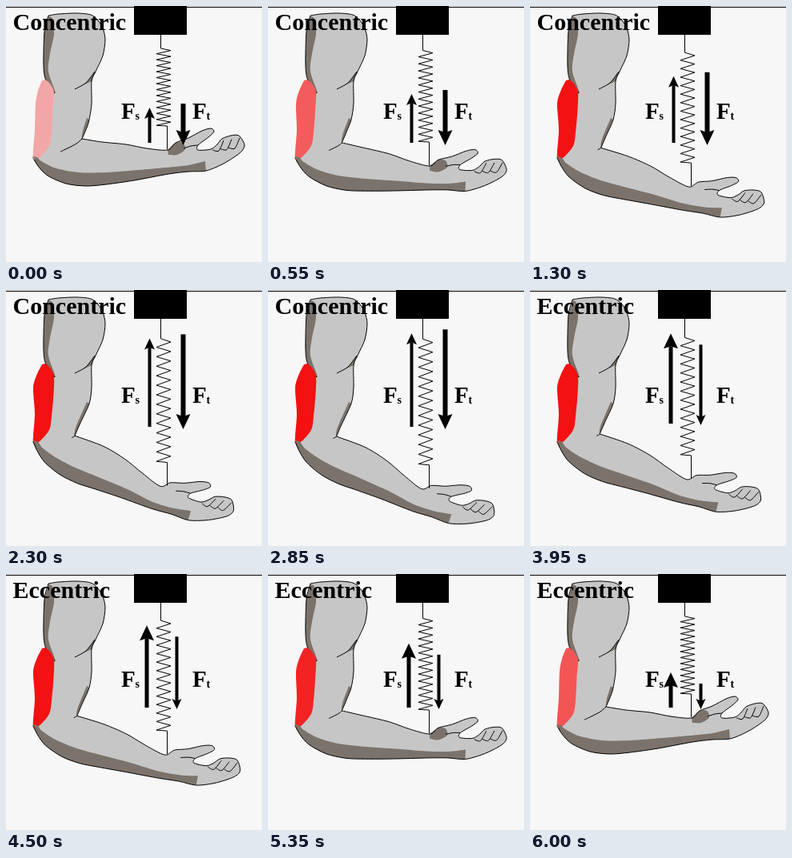
An HTML page with a canvas for the animation above (6100 ms loop, 320 by 320 pixels).

```html
<!DOCTYPE html>
<html lang="en">
<head>
<meta charset="utf-8">
<title>Muscle contraction</title>
<style>
html, body { margin: 0; width: 100%; height: 100%; overflow: hidden; background: #f7f7f7; }
canvas { display: block; width: 320px; height: 320px; }
</style>
</head>
<body>
<canvas id="stage" width="320" height="320"></canvas>
<script>
const ctx = document.getElementById('stage').getContext('2d');
const SKIN = '#c6c6c6', SHADE = '#7b736b', INK = '#000';
const LOOP = 6100;
const STEPS = [250, 550, 900, 1300, 1750, 2300, 2850, 3400, 3950, 4500, 4950, 5350, 5700, 6000];
const ELBOW = { x: 32, y: 190 };

// Key points of the fully bent arm; bend() gives every other pose.
const DELTOID = [53,12, 66,10, 88,9, 106,11, 115,18, 121,28, 124,42, 121,62, 112,82];
const UPPER_EDGE = [120,170, 150,173, 176,178, 202,180];
const THUMB = [212,171, 228,165, 245,156, 256,153, 260,157, 253,164, 240,174];
const FINGERS = [240,180, 256,179, 264,173, 270,166, 281,162, 291,162, 298,173, 295,181, 285,189, 270,198, 250,206];
const LOWER_EDGE = [250,206, 228,207, 203,210, 160,218, 125,223, 100,225, 75,222, 52,212, 40,200, 34,189];
const SHADE_EDGE = [60,202, 90,208, 125,208, 165,205, 200,202, 228,199, 249,194];
const THUMB_BASE = [202,180, 212,171, 221,171, 224,179, 214,186, 203,186];
const FINGER_GAP = [258,180, 266,181, 272,168];

// Turns points about the elbow, less so close to the joint.
function bend(list, angle) {
  const out = [];
  for (let i = 0; i < list.length; i += 2) {
    const dx = list[i] - ELBOW.x, dy = list[i + 1] - ELBOW.y;
    const r = Math.hypot(dx, dy);
    const a = Math.atan2(dy, dx) + angle * Math.min(1, Math.sqrt(r / 170));
    out.push(ELBOW.x + r * Math.cos(a), ELBOW.y + r * Math.sin(a));
  }
  return out;
}

const shift = (list, dx, dy) => list.map((v, i) => v + (i % 2 ? dy : dx));

// Smooth curve through a flat list of coordinates.
function trace(list) {
  const n = list.length / 2;
  const at = i => {
    const j = 2 * Math.max(0, Math.min(n - 1, i));
    return [list[j], list[j + 1]];
  };
  ctx.beginPath();
  ctx.moveTo(...at(0));
  for (let i = 0; i < n - 1; i++) {
    const [a, b, c, d] = [at(i - 1), at(i), at(i + 1), at(i + 2)];
    ctx.bezierCurveTo(b[0] + (c[0] - a[0]) / 7, b[1] + (c[1] - a[1]) / 7,
      c[0] - (d[0] - b[0]) / 7, c[1] - (d[1] - b[1]) / 7, c[0], c[1]);
  }
}

function fill(list, color) {
  trace(list);
  ctx.fillStyle = color;
  ctx.fill();
}

function line(list) {
  trace(list);
  ctx.strokeStyle = INK;
  ctx.lineWidth = 1;
  ctx.stroke();
}

function polyline(list) {
  ctx.beginPath();
  for (let i = 0; i < list.length; i += 2) ctx.lineTo(list[i], list[i + 1]);
  ctx.strokeStyle = INK;
  ctx.lineWidth = 1;
  ctx.stroke();
}

function arrow(x, tail, tip, shaft, head) {
  const dir = Math.sign(tip - tail);
  const barb = tip - dir * (head + 1), notch = barb + dir * 3;
  ctx.fillStyle = INK;
  ctx.fillRect(x - shaft / 2, Math.min(tail, notch), shaft, Math.abs(tail - notch));
  ctx.beginPath();
  ctx.moveTo(x, tip);
  ctx.lineTo(x - head / 2, barb);
  ctx.lineTo(x, notch);
  ctx.lineTo(x + head / 2, barb);
  ctx.fill();
}

function text(str, x, y, size) {
  ctx.font = `bold ${size}px "Liberation Serif", serif`;
  ctx.fillStyle = INK;
  ctx.fillText(str, x, y);
}

function drawArm(opening, angle) {
  const cx = 95 - 1.5 * opening, cy = 166 + 2.7 * opening;
  const inner = [107,94, 107,122, 104,142, cx + 6, cy - 14, cx, cy];
  const lower = bend(LOWER_EDGE, angle);
  const forearm = [cx, cy, ...bend([...UPPER_EDGE, ...THUMB, ...FINGERS], angle), ...lower.slice(2)];

  fill([...DELTOID, ...inner, 75,205, 34,189, 52,165, 60,108, 50,92, 47,75, 48,32], SKIN);
  fill(forearm, SKIN);
  fill([...lower, ...bend(SHADE_EDGE, angle)], SHADE);
  fill([53,13, 58,16, 60,35, 55,60, 53,82, 62,109, 50,93, 47,73, 48,32], SHADE);
  fill([86,104, 100,96, 111,82, 107,94], SHADE);
  fill([...inner.slice(4), cx + 1, cy - 10, 101,140], SHADE);
  if (opening < 4) fill(bend(THUMB_BASE, angle), SHADE);

  line([...DELTOID, ...inner]);
  line([53,12, 48,32, 47,75, 50,93, 61,109]);
  line([86,104, 100,96, 111,82]);
  const fold = Math.max(4, 27 - 6 * opening);
  line([cx, cy, cx - fold * .3, cy + fold * .25, cx - fold, cy + fold * .6]);
  line(forearm);
  for (let i = 0; i < 3; i++) line(bend(shift(FINGER_GAP, i * 10, i * -1.5), angle));
  line(bend([240,174, 231,175, 222,178], angle));
}

function drawMuscle(position, eccentric) {
  const bulge = Math.min(3, position);
  const pale = Math.max(17, eccentric ? 85 - 25 * position : 166 - 37 * position);
  fill([49,92, 55,97, 60,108, 58.5 + bulge / 3,130, 57,158, 54,175, 41,190, 34,189,
    36,155, 37 - bulge,122, 40 - bulge / 2,106, 45,93], `rgb(243,${pale},${pale})`);
  fill([34,188, 40,190, 46,200, 40,199], SHADE);
}

function drawSpring(top, end, wrist) {
  const turns = 13, pitch = (end - top) / turns;
  const coil = [193.5,36, 193.5,top];
  for (let i = 0; i < turns; i++) {
    const y = top + i * pitch;
    coil.push(206, y + pitch * .35, 188, y + pitch * .9);
  }
  polyline([...coil, 201.5,end, 201.5,wrist]);
}

function drawForces(position, eccentric) {
  if (eccentric) {
    const rise = 78 * Math.pow(position / 6, .7);
    arrow(176, 167, 123 - rise, 5, 18);
    arrow(213.5, 137 - rise, 169, 4, 12);
  } else {
    const rise = 7.2 * position + .65 * position ** 2;
    arrow(179.5, 171, 127 - rise, 4, 13);
    arrow(221.5, 122 - rise, 174, 6, 18);
  }
}

function draw(time) {
  const step = STEPS.filter(t => t <= time).length;
  const eccentric = step > 7;
  const position = Math.min(6.4, eccentric ? 14 - step : step);
  const opening = position - .22 * Math.sin(Math.PI * position / 3);
  const angle = .065 * opening;
  const wrist = bend([202, 179], angle)[1];

  ctx.fillStyle = '#f7f7f7';
  ctx.fillRect(0, 0, 320, 320);
  drawArm(opening, angle);
  drawMuscle(position, eccentric);
  ctx.fillStyle = INK;
  ctx.fillRect(0, 1, 320, 1);
  ctx.fillRect(160, 0, 66, 36);
  drawSpring(53 + 1.3 * position, wrist - 29, wrist);
  drawForces(position, eccentric);

  text(eccentric ? 'Eccentric' : 'Concentric', 8.5, 30, 30);
  for (const [sub, x] of [['s', 144], ['t', 233]]) {
    text('F', x, 141, 29);
    text(sub, x + 17.5, 141.5, 14);
  }
}

const start = performance.now();
function tick() {
  draw((performance.now() - start) % LOOP);
  requestAnimationFrame(tick);
}
tick();
</script>
</body>
</html>
```
